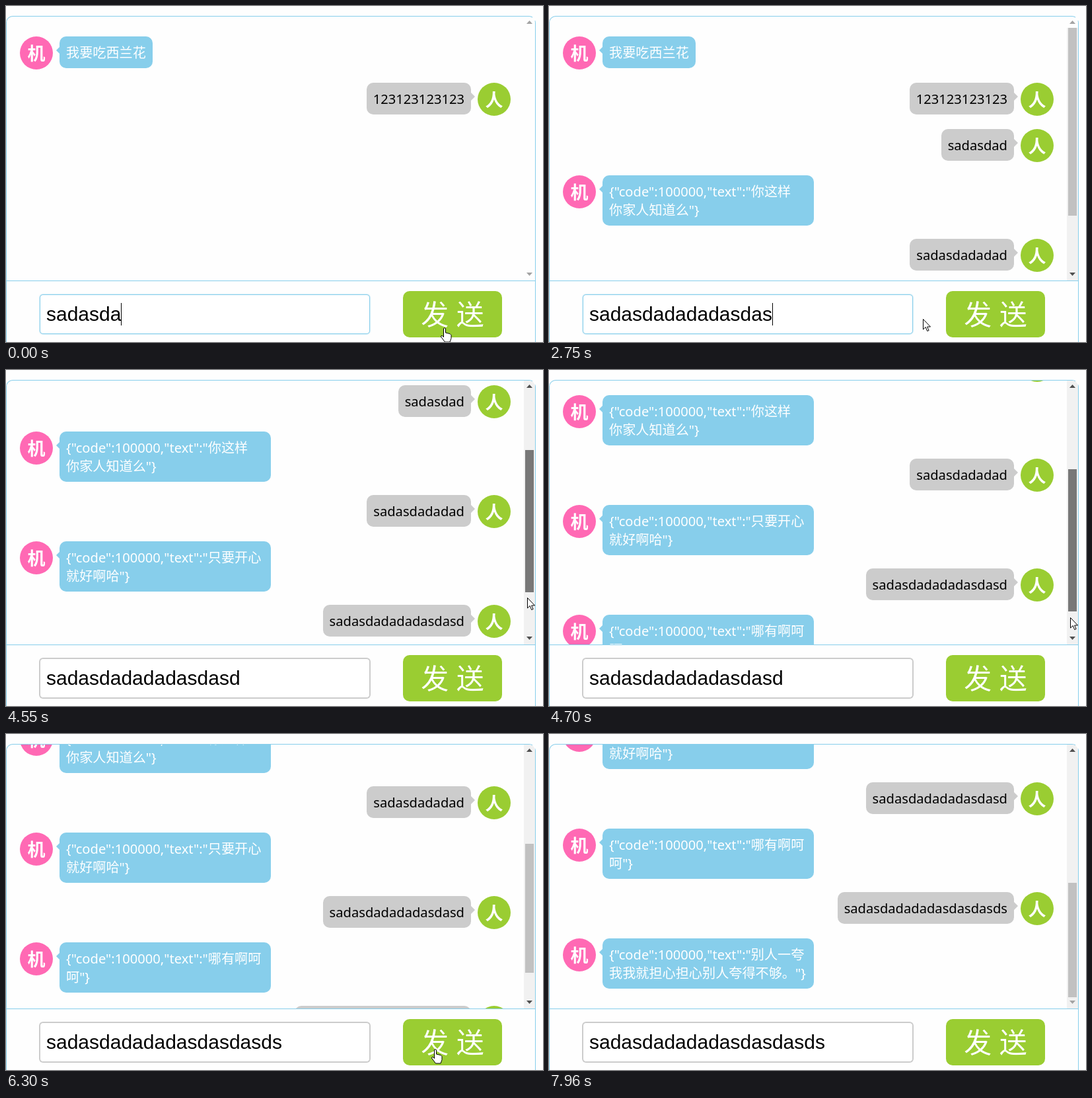
Write an HTML page that moves like this. It is 813 px wide and 508 px high and loops after 9140 ms.

```html
<!DOCTYPE html>
<html lang="zh-CN">
<head>
<meta charset="utf-8">
<style>
html, body { margin: 0; width: 100%; height: 100%; overflow: hidden; background: #fefefe }
div, svg { position: absolute; box-sizing: border-box }
#stage, #mouse { left: 0; top: 0; width: 100%; height: 100%; overflow: hidden }
#frame { left: 0; top: 15px; bottom: 0; width: 802px; border: 1px solid #87ceeb; border-bottom: 0; border-radius: 10px 10px 0 0 }
#notch { left: 797px; top: 15px; width: 5px; height: 7px; background: #fefefe }
#chat { left: 1px; top: 16px; width: 800px; height: 399px; overflow: hidden; border-radius: 9px 9px 0 0 }
#list { left: -1px; top: -16px; width: 802px }
#rule { left: 1px; top: 415px; width: 800px; height: 1px; background: #87ceeb }
.msg { left: 0; width: 802px; color: #fff; font: 20.15px/28px "Noto Sans", "Noto Sans CJK SC", "Noto Sans CJK JP", sans-serif }
.face { left: 21px; width: 50px; height: 50px; border-radius: 50%; background: #ff69b4; text-align: center;
  font: bold 27px/50px "Noto Sans CJK SC", "Noto Sans CJK JP", sans-serif }
.text { left: 81px; padding: 10px; border-radius: 10px; background: #87ceeb; white-space: pre }
.text.wide { width: 320px }
.tip { left: 76px; top: 15px; width: 6px; height: 12px; background: #87ceeb; clip-path: polygon(100% 0, 0 50%, 100% 100%) }
.me { color: #000 }
.me .face { left: 714px; background: #9acd32; color: #fff }
.me .text { left: auto; right: 98px; background: #ccc }
.me .tip { left: 704px; background: #ccc; clip-path: polygon(0 0, 100% 50%, 0 100%) }
#track { left: 783px; bottom: 0; width: 17px; background: #f1f1f1 }
#thumb { left: 785px; width: 13px }
.arrow { left: 787px; width: 9px; height: 5px }
#up { top: 6px; clip-path: polygon(0 100%, 50% 0, 100% 100%) }
#down { top: 387px; clip-path: polygon(0 0, 50% 100%, 100% 0) }
#input { left: 51px; top: 436px; width: 500px; height: 60px; border: 1px solid #ccc; border-radius: 5px; box-shadow: 0 0 0 1px #ccc;
  background: #fff; color: #000; padding-left: 9px; font: 30px/58px "Liberation Sans", Arial, sans-serif; white-space: pre }
#input.on { border-color: #87ceeb; box-shadow: 0 0 2px #87ceeb }
#caret { display: inline-block; width: 1px; height: 34px; vertical-align: -7px; background: #000 }
#send { left: 601px; top: 431px; width: 150px; height: 70px; border-radius: 10px; background: #9acd32; color: #fff; text-align: center;
  font: 42px/74px "Liberation Sans", "Noto Sans CJK SC", "Noto Sans CJK JP", sans-serif }
</style>
</head>
<body>
<div id="stage">
  <div id="frame"></div><div id="notch"></div>
  <div id="chat">
    <div id="list"></div>
    <div id="track"></div><div id="thumb"></div>
    <div id="up" class="arrow"></div><div id="down" class="arrow"></div>
  </div>
  <div id="rule"></div>
  <div id="input"><span id="typed"></span><span id="caret"></span></div>
  <div id="send">发 送</div>
  <svg id="mouse"><path id="pointer" fill="#fff" stroke="#000"/></svg>
</div>
<script>
const $ = id => document.getElementById(id);
const clamp = (v, lo, hi) => Math.min(Math.max(v, lo), hi);
const show = (id, on) => $(id).style.visibility = on ? '' : 'hidden';

// The picture advances in even steps; all times below count steps.
const LOOP = 9140, FIRST = 120, STEP = 137.5, LAST = 57;
const VIEW = 399, TRACK = 365, DELAY = 2;
const TYPED = 'sadasdadadadasdasdasds';

// Each round: one key per step from start, then a click on send, then a reply
const rounds = [
  { start: -7, keys: 8, send: 2, reply: '你这样\n你家人知道么' },
  { start: 6, keys: 4, send: 12, reply: '只要开心\n就好啊哈' },
  { start: 15, keys: 6, send: 22, reply: '哪有啊呵\n呵' },
  { start: 39, keys: 4, send: 44, reply: '别人一夸\n我我就担心担心别人夸得不够。' }
];

// Key points: step, values, and how long to rest there
const key = (at, v, rest = 0) => ({ at, v, end: at + rest });
const scroll = [key(30, [0]), key(32, [163]), key(34, [273], 16), key(51, [278]), key(54, [445])];
const path = [
  key(-1, [664, 487], 3), key(5, [447, 473], 4), key(11, [665, 484], 2), key(15, [480, 470], 3),
  key(19, [566, 473]), key(20, [650, 477], 2), key(23, [556, 462]), key(29, [790, 235], 1),
  key(32, [789, 344]), key(34, [789, 403]), key(37, [478, 466], 4), key(43, [650, 477], 1),
  key(48, [797, 312], 2), key(51, [797, 314]), key(54, [797, 386]), key(56, [765, 485])
];
function tween(keys, k) {
  const a = keys.findLast(q => q.at <= k) || keys[0], b = keys[keys.indexOf(a) + 1] || a;
  const p = clamp((k - a.end) / (b.at - a.end || 1), 0, 1);
  return a.v.map((v, i) => Math.round(v + (b.v[i] - v) * p));
}

// Build the conversation; from is the step at which a message appears
const rows = [];
let y = 46, sent = 0;
function say(me, text, from) {
  const el = document.createElement('div'), wide = text.includes('\n');
  el.className = me ? 'msg me' : 'msg';
  el.style.top = y + 'px';
  el.innerHTML = `<div class="face">${me ? '人' : '机'}</div><div class="tip"></div>` +
    `<div class="text${wide ? ' wide' : ''}">${text}</div>`;
  $('list').append(el);
  y += wide ? 96 : 70;
  rows.push({ el, from, size: y - 6 });
}
say(false, '我要吃西兰花', -1);
say(true, '123123123123', -1);
for (const r of rounds) {
  sent += r.keys;
  say(true, TYPED.slice(0, sent), r.send);
  say(false, `{"code":100000,"text":"${r.reply}"}`, r.send + DELAY);
}

const ARROW = 'M.5 .5V16l3.7-3.5 2.5 6 2.4-1-2.5-5.5H11.5z';
const HAND = 'M-1.5 .5q1.5-1.5 3 0V7l6.5 1.5 2 2v5l-2 5.5H.5l-6-8q0-2 2-1.5l2 2z';
const BEAM = 'M-3-7.5H4M.5-7.5v16M-3 8.5H4';
function over(id, x, y) {
  const r = $(id).getBoundingClientRect();
  return x > r.left && x < r.right && y > r.top && y < r.bottom;
}

function draw(time) {
  const k = clamp(Math.floor((time - FIRST) / STEP), -1, LAST);
  const [s] = tween(scroll, k), [mx, my] = tween(path, k);

  const seen = rows.filter(r => r.from <= k), { size } = seen.at(-1);
  for (const r of rows) r.el.style.display = seen.includes(r) ? '' : 'none';
  $('list').style.top = -16 - s + 'px';

  const max = size - VIEW, len = TRACK * VIEW / size, thumb = $('thumb').style;
  const dragging = s !== tween(scroll, k - 1)[0];
  show('track', max > 0);
  show('thumb', max > 0);
  $('track').style.top = s ? 0 : '17px';
  thumb.top = Math.round(17 + s / max * (TRACK - len)) + 'px';
  thumb.height = Math.round(len) + 'px';
  thumb.background = dragging ? '#787878' : over('thumb', mx, my) ? '#a8a8a8' : '#c1c1c1';
  $('up').style.background = s ? '#505050' : '#a3a3a3';
  $('down').style.background = s < max ? '#505050' : '#a3a3a3';

  const focused = rounds.some(r => r.start <= k && k < r.send);
  const typed = rounds.reduce((n, r) => n + clamp(k - r.start + 1, 0, r.keys), 0);
  $('typed').textContent = TYPED.slice(0, typed);
  $('input').className = focused ? 'on' : '';
  show('caret', focused);

  $('pointer').setAttribute('d', over('send', mx, my) ? HAND : over('input', mx, my) ? BEAM : ARROW);
  $('pointer').setAttribute('transform', `translate(${mx} ${my})`);
  show('mouse', k < LAST);
}

const start = performance.now();
function loop() {
  draw((performance.now() - start) % LOOP);
  requestAnimationFrame(loop);
}
loop();
</script>
</body>
</html>
```
